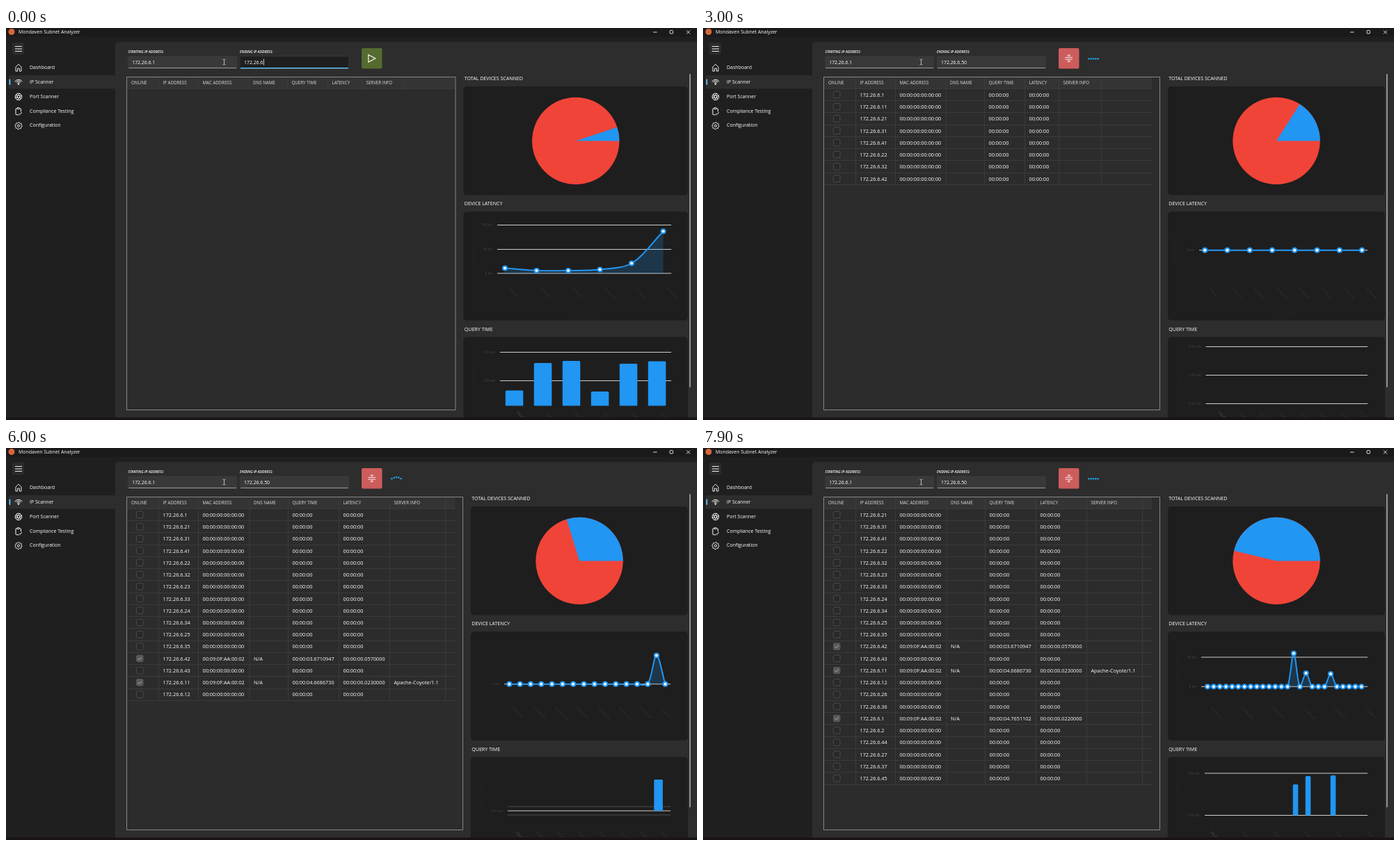
An HTML page with a canvas that plays this animation: 993x564 px, repeating every 8000 ms.

```html
<!DOCTYPE html>
<html lang="en">
<head>
<meta charset="utf-8">
<title>Mondaven Subnet Analyzer</title>
<style>
html, body { margin: 0; width: 100%; height: 100%; overflow: hidden; background: #1f1f1f; }
canvas { display: block; }
</style>
</head>
<body>
<canvas id="stage" width="993" height="564"></canvas>
<script>
const ctx = document.getElementById('stage').getContext('2d');
const LOOP = 8000, BLUE = '#2196f3', SANS = '"Open Sans", "Noto Sans", sans-serif';
const clamp = v => Math.max(0, Math.min(1, v));
const mix = (a, b, k) => a + (b - a) * k;

function text(str, x, mid, size, color = '#fff', align = 'left', style = '500') {
  ctx.font = `${style} ${size}px ${SANS}`;
  ctx.fillStyle = color;
  ctx.textAlign = align;
  ctx.fillText(str, x, mid + size * 0.36);
}
function turned(str, x, y, angle, size, color, align = 'left') {
  ctx.save();
  ctx.translate(x, y);
  ctx.rotate(angle);
  text(str, 0, 0, size, color, align);
  ctx.restore();
}
function rect(x, y, w, h, color) {
  ctx.fillStyle = color;
  ctx.fillRect(x, y, w, h);
}
function round(x, y, w, h, r, fill, stroke) {
  ctx.beginPath();
  ctx.roundRect(x, y, w, h, r);
  if (fill) { ctx.fillStyle = fill; ctx.fill(); }
  if (stroke) { ctx.strokeStyle = stroke; ctx.lineWidth = 1; ctx.stroke(); }
}
function path(points, color = '#fff', width = 1, closed = false) {
  ctx.beginPath();
  points.forEach(([x, y]) => ctx.lineTo(x, y));
  if (closed) ctx.closePath();
  ctx.strokeStyle = color;
  ctx.lineWidth = width;
  ctx.stroke();
}
function arc(x, y, r, a = 0, b = Math.PI * 2, color = '#fff', width = 1) {
  ctx.beginPath();
  ctx.arc(x, y, r, a, b);
  ctx.strokeStyle = color;
  ctx.lineWidth = width;
  ctx.stroke();
}
function disc(x, y, r, color) {
  ctx.beginPath();
  ctx.arc(x, y, r, 0, Math.PI * 2);
  ctx.fillStyle = color;
  ctx.fill();
}

// ---- window frame and navigation ----
const icons = [
  (x, y) => path([[x - 4, y - 1], [x, y - 5], [x + 4, y - 1], [x + 4, y + 5], [x + 1.4, y + 5],
    [x + 1.4, y + 1], [x - 1.4, y + 1], [x - 1.4, y + 5], [x - 4, y + 5]], '#fff', 0.9, true),
  (x, y) => {
    for (const r of [2.2, 4.2, 6.2]) arc(x, y + 2.5, r, -Math.PI * 0.82, -Math.PI * 0.18, '#fff', 1);
    disc(x, y + 2.6, 1.2, '#fff');
  },
  (x, y) => {
    arc(x, y, 4.8);
    for (let i = 0; i < 6; i++) {
      const a = i * Math.PI / 3;
      path([[x + 2 * Math.cos(a), y + 2 * Math.sin(a)],
        [x + 4.8 * Math.cos(a + 0.9), y + 4.8 * Math.sin(a + 0.9)]], '#fff', 0.9);
    }
    arc(x, y, 2);
  },
  (x, y) => {
    round(x - 4, y - 4, 7.5, 9, 1, null, '#fff');
    round(x - 2, y - 5.2, 3.5, 2, 0.8, '#1f1f1f', '#fff');
    rect(x + 0.6, y + 0.6, 4.4, 5, '#1f1f1f');
    path([[x + 1, y + 3], [x + 2.4, y + 4.4], [x + 4.8, y + 1.4]]);
  },
  (x, y) => {
    const rim = [];
    for (let i = 0; i < 32; i++) {
      const a = i * Math.PI / 16, r = i % 4 < 2 ? 5.1 : 4.1;
      rim.push([x + r * Math.cos(a), y + r * Math.sin(a)]);
    }
    path(rim, '#fff', 0.9, true);
    arc(x, y, 1.6, 0, Math.PI * 2, '#fff', 0.9);
  }
];
const menu = ['Dashboard', 'IP Scanner', 'Port Scanner', 'Compliance Testing', 'Configuration'];

function drawFrame() {
  rect(0, 0, 993, 564, '#1f1f1f');
  rect(0, 0, 993, 12.5, '#1b1a1a');
  disc(8, 5.5, 4.5, '#d9653b');
  text('Mondaven Subnet Analyzer', 18, 5.8, 6.95);
  path([[930, 6], [935.5, 6]], '#ddd');
  round(954, 3.5, 4.5, 4.5, 1, null, '#ddd');
  path([[978, 3.5], [983, 8.5]], '#ddd');
  path([[983, 3.5], [978, 8.5]], '#ddd');
  round(157, 20, 850, 550, 5, '#2d2d2d');
  round(9, 21, 17, 17.5, 3, '#2c2c2c');
  for (const y of [26.5, 30, 33.5]) path([[13, y], [23, y]], '#eee');
  round(4, 68, 153, 19.5, 2, '#2d2d2d');
  round(4.5, 73.5, 1.8, 8.5, 1, '#60cdff');
  menu.forEach((label, i) => {
    const y = 56.3 + i * 20.9;
    icons[i](18, y + 0.8);
    text(label, 34, y, 7);
  });
  round(982, 66, 1.8, 451, 1, '#9c9c9c');
}

// ---- address inputs and run button ----
function input(x, value, focused) {
  round(x, 40.5, 157, 17.5, 2, focused ? '#1f1f1f' : '#393939', '#363636');
  rect(x + 1, 57, 155, focused ? 1.4 : 1, focused ? '#60cdff' : '#9a9a9a');
  text(value, x + 6, 49.2, 6.9);
  if (focused) rect(x + 6.6 + ctx.measureText(value).width, 44.5, 0.8, 9, '#fff');
}
function drawControls(t) {
  const typed = t < 200 ? '' : t < 700 ? '.' : t < 800 ? '.5' : '.50';
  text('STARTING IP ADDRESS:', 175.5, 33.8, 5.1, '#fff', 'left', 'italic 600');
  text('ENDING IP ADDRESS:', 336, 33.8, 5.1, '#fff', 'left', 'italic 600');
  input(175.2, '172.26.6.1', false);
  input(336, '172.26.6' + typed, t < 1100);
  path([[311.5, 45], [313.5, 45.6], [315.5, 45]], '#ccc', 0.8);
  path([[313.5, 45.6], [313.5, 52.4]], '#ccc', 0.9);
  path([[311.5, 53], [313.5, 52.4], [315.5, 53]], '#ccc', 0.8);

  const scanning = t >= 1400;
  const green = t >= 200 && t < 800 ? '#4b5b2d' : '#556b2f';
  round(511, 29, 29.5, 29.5, 2, scanning ? '#cd5c5c' : green);
  if (!scanning) {
    path([[520.8, 38.5], [530.8, 43.7], [520.8, 49]], '#fff', 1.1, true);
    if (t >= 1100) round(510.5, 28.5, 30.5, 30.5, 3, null, '#fff');
    return;
  }
  for (const s of [-1, 1]) {
    const y = d => 43.7 + s * d;
    path([[520.5, y(1.4)], [531, y(1.4)]], '#fff', 0.9);
    path([[525.8, y(3)], [525.8, y(5.8)]], '#fff', 0.9);
    path([[523.4, y(5)], [525.8, y(3)], [528.2, y(5)]], '#fff', 0.8);
  }
  const u = ((t - 1400) % 1200) / 1000;
  for (let i = 0; i < 5; i++) {
    const p = ((u - 0.75 - i * 0.06 + 1.2) % 1.2) / 0.25;
    const lift = p < 1 ? 2.3 * Math.sin(Math.PI * p) : 0;
    disc(554.4 + i * 3.3, 44.3 - lift, 1.3, '#1ba1e2');
  }
}

// ---- results table; a star marks a host that answered ----
const batches = [
  [1400, '1 11 21 31 41'], [2300, '22 32'], [2500, '42'], [4100, '23 33'], [4300, '24 34'],
  [5200, '25 35'], [5700, '42* 43'], [5900, '11* 12'], [6200, '26 36'], [6300, '1* 2'],
  [6500, '44'], [7100, '27 37'], [7400, '45']
];
const replies = {
  42: ['00:00:03.6710947', '00:00:00.0570000', ''],
  11: ['00:00:04.6686730', '00:00:00.0230000', 'Apache-Coyote/1.1'],
  1: ['00:00:04.7651102', '00:00:00.0220000', '']
};
const heads = ['ONLINE', 'IP ADDRESS', 'MAC ADDRESS', 'DNS NAME', 'QUERY TIME', 'LATENCY', 'SERVER INFO'];

function rowsAt(t) {
  let rows = [];
  for (const [time, hosts] of batches) {
    if (time > t) break;
    for (const host of hosts.split(' ')) {
      const id = parseInt(host), online = host.endsWith('*');
      if (online) rows = rows.filter(r => r.id !== id);
      rows.push({ id, online });
    }
  }
  return rows;
}
function drawTable(t, rows) {
  const wide = rows.some(r => r.online);
  const cols = wide ? [174, 219.5, 276.5, 350, 405.5, 478.5, 551.5, 631.5]
    : [174, 219.5, 276.5, 349, 404.5, 462.5, 511.5, 572.5];
  const right = t < 1400 ? 646 : 656.5, H = 17.24, end = 87.5 + rows.length * H;
  rect(173.5, 70, right - 173.5, 479.5, '#2c2c2c');
  rect(174, 70.5, 471, 17, '#343434');
  cols.slice(1).forEach(x => path([[x, 71], [x, end]], '#3b3b3b'));
  for (let i = 0; i <= rows.length; i++) {
    const y = Math.round(87 + i * H) + 0.5;
    path([[174, y], [645, y]], '#3b3b3b');
  }
  heads.forEach((h, i) => text(h, cols[i] + 6, 79.2, 6.2, '#dcdcdc'));
  rows.forEach(({ id, online }, i) => {
    const y = 96.2 + i * H;
    round(187.5, y - 5, 9.5, 9.5, 2, online ? '#585858' : '#292929', online ? '#585858' : '#4a4a4a');
    if (online) path([[189.8, y - 0.2], [191.6, y + 1.6], [194.8, y - 1.8]], '#bbb', 0.9);
    const zero = '00:00:00', [query, latency, server] = online ? replies[id] : [zero, zero, ''];
    const cells = ['172.26.6.' + id, online ? '00:09:0F:AA:00:02' : zero + ':00:00:00',
      online ? 'N/A' : '', query, latency, server];
    cells.forEach((c, k) => text(c, cols[k + 1] + 6, y, 7.3));
  });
  round(173.5, 70.5, right - 173.5, 479, 0, null, '#868686');
}

// ---- charts ----
const previous = dx => ({
  t: 0, n: 6, step: 1, x0: 717 + dx, gap: 45.5, tail: 45.5, base: 353, left: 706 + dx, right: 956 + dx,
  grid: [[283.5, '100 ms'], [318.5, '50 ms'], [353, '0 ms']],
  ys: { 0: 345.5, 1: 349, 2: 349, 3: 347.5, 4: 338.5, 5: 292.5 },
  qLeft: 710 + dx, qBase: 543.5, slots: 6, qGrid: [[466.5, '6.00 sec'], [507.5, '3.00 sec']],
  bars: { 0: 521.5, 1: 482, 2: 479, 3: 523, 4: 483, 5: 479.5 }
});
const flat = (t, n, x0, gap, tail = gap) => ({
  t, n, step: 1, x0, gap, tail, base: 319.7, left: 713, right: 955, grid: [[319.7, '0 ms']], ys: {},
  qLeft: 722.5, qBase: 541, slots: n, bars: {},
  qGrid: [[458.5, '0.00 sec'], [499.5, '0.00 sec'], [540.5, '-0.00 sec']]
});
const active = o => ({ left: 716, right: 955, tail: o.gap, qLeft: 721, slots: o.n, ...o });
const states = [
  previous(0),
  flat(1500, 5, 721.2, 56.4),
  flat(2500, 8, 721.2, 32.25),
  flat(4100, 12, 723.5, 20.6, 17.6),
  flat(5200, 14, 723, 17.2),
  active({ t: 5700, n: 16, step: 2, x0: 723.3, gap: 15.3, tail: 12.6, base: 339.7, grid: [[339.7, '0 ms']],
    ys: { 14: 298.5 }, qBase: 522, slots: 15.67, bars: { 14: 477 },
    qGrid: [[522, '0.00 sec'], [516, '', 0.25], [528, '', 0.25]] }),
  active({ t: 6300, n: 22, step: 2, x0: 726.5, gap: 10.39, base: 343.4,
    grid: [[295.5, '50 ms'], [343.4, '0 ms']], ys: { 14: 295.5, 16: 324, 20: 325 }, slots: 21.9,
    qBase: 528.5, bars: { 14: 484, 16: 473, 20: 472 }, qGrid: [[467.5, '5.00 sec'], [528.5, '0.00 sec']] }),
  active({ t: 7400, n: 26, step: 5, x0: 725, gap: 8.85, base: 343.3,
    grid: [[301, '50 ms'], [343.3, '0 ms']], ys: { 14: 295.5, 16: 324, 20: 325 },
    qBase: 528.5, bars: { 14: 484, 16: 472, 20: 471 }, qGrid: [[468, '5.00 sec'], [528.5, '0.00 sec']] })
];
const pointAt = (s, i) => [
  s.x0 + s.gap * Math.min(i, s.n - 3) + s.tail * Math.max(0, i - s.n + 3), s.ys[i] ?? s.base];
const slotWidth = s => (s.right - s.qLeft) / s.slots;
const barAt = (s, i) => [s.qLeft + slotWidth(s) * (i + 0.5), s.bars[i] ?? s.qBase];

function gridLines(lines, left, right, labelGap, alpha) {
  for (const [y, label, dim = 1] of lines) {
    ctx.globalAlpha = alpha * dim;
    path([[left, y], [right, y]], '#cfcfcf');
    text(label, left - labelGap, y, 4.8, '#444', 'right');
  }
  ctx.globalAlpha = 1;
}
// Smooth curve: handles run parallel to the line joining neighbouring midpoints,
// shared out by the lengths of the two segments.
function trace(pts) {
  const SMOOTH = 0.65, at = i => pts[Math.max(0, Math.min(pts.length - 1, i))];
  const length = i => Math.hypot(at(i + 1)[0] - at(i)[0], at(i + 1)[1] - at(i)[1]);
  const handle = (i, side) => {
    const before = length(i - 1), after = length(i);
    const share = (side < 0 ? -before : after) / (before + after);
    return [0, 1].map(c => at(i)[c] + (at(i + 1)[c] - at(i - 1)[c]) / 2 * share * SMOOTH);
  };
  ctx.lineTo(...pts[0]);
  for (let i = 1; i < pts.length; i++)
    ctx.bezierCurveTo(...handle(i - 1, 1), ...handle(i, -1), ...pts[i]);
}
function drawLatency(s, prev, k, ids) {
  if (k < 1) gridLines(prev.grid, prev.left, prev.right, 6.8, 1 - k);
  gridLines(s.grid, s.left, s.right, 6.8, k);
  const base = mix(prev.base, s.base, k), pts = [];
  for (let i = 0; i < s.n; i++) {
    const to = pointAt(s, i), from = i < prev.n ? pointAt(prev, i) : [to[0], prev.base];
    pts.push([mix(from[0], to[0], k), mix(from[1], to[1], k)]);
  }
  ctx.beginPath();
  ctx.moveTo(pts[0][0], base);
  trace(pts);
  ctx.lineTo(pts[s.n - 1][0], base);
  ctx.fillStyle = 'rgba(33,150,243,0.2)';
  ctx.fill();
  ctx.beginPath();
  trace(pts);
  ctx.strokeStyle = BLUE;
  ctx.lineWidth = 2;
  ctx.stroke();
  for (const [x, y] of pts) {
    disc(x, y, 3, '#fff');
    arc(x, y, 3.1, 0, Math.PI * 2, BLUE, 2);
  }
  for (let i = 0; i < s.n; i += s.step)
    turned('172.26.6.' + ids(i), pts[i][0] + 4, 372, Math.PI / 4, 4.6, '#383838');
  turned('Latency (ms)', s.left - 35, 320, -Math.PI / 2, 7, '#242424', 'center');
  text('IP Address', (s.left + s.right) / 2, 408, 7, '#242424', 'center');
}
function drawQuery(s, prev, k, ids) {
  if (k < 1) gridLines(prev.qGrid, prev.qLeft, prev.right, 6.8, 1 - k);
  gridLines(s.qGrid, s.qLeft, s.right, 6.8, k);
  const base = mix(prev.qBase, s.qBase, k);
  const w = mix(...[prev, s].map(q => Math.min(25.5, slotWidth(q) * 0.84)), k);
  for (let i = 0; i < s.n; i++) {
    const to = barAt(s, i), from = i < prev.n ? barAt(prev, i) : [to[0], prev.qBase];
    const x = mix(from[0], to[0], k), y = mix(from[1], to[1], k);
    if (base - y > 0.5) round(x - w / 2, y, w, base - y, [1.5, 1.5, 0, 0], BLUE);
    if (i % s.step === 0)
      turned('172.26.6.' + ids(i), x + 4, 552, Math.PI / 4, 4.6, i ? '#3c3c3c' : '#666');
  }
  turned('Query Time', s.qLeft - 39, 500, -Math.PI / 2, 7, '#242424', 'center');
}

const pieKeys = [
  [1400, 18.2], [1900, 36], [2300, 36], [2800, 57.6], [4100, 57.6], [4400, 84.7], [4500, 86.4],
  [5200, 86.4], [5600, 100.8], [5800, 100.8], [6000, 107], [6200, 115.2], [6600, 136.8],
  [6700, 144], [7100, 144], [7600, 166.4]
];
function pieAngle(t) {
  if (t <= pieKeys[0][0]) return pieKeys[0][1];
  const i = pieKeys.findIndex(key => key[0] > t);
  if (i < 0) return pieKeys[pieKeys.length - 1][1];
  const [a, from] = pieKeys[i - 1], [b, to] = pieKeys[i];
  return mix(from, to, (t - a) / (b - a));
}
function drawPie(t) {
  const x = t < 1400 ? 818.7 : t < 1500 ? 829.2 : 824, a = -pieAngle(t) * Math.PI / 180;
  disc(x, 162.4, 62.7, '#f04438');
  ctx.beginPath();
  ctx.moveTo(x, 162.4);
  ctx.arc(x, 162.4, 62.7, a, 0);
  ctx.fillStyle = BLUE;
  ctx.fill();
}
function drawCharts(t, rows) {
  const x = t < 1400 ? 657.3 : 667.8;
  ['TOTAL DEVICES SCANNED', 'DEVICE LATENCY', 'QUERY TIME'].forEach((title, i) => {
    text(title, x + 1.5, 72.8 + i * 180.1, 7.05);
    round(x, 84 + i * 180.3, 980 - x, 156.5, 5, '#1e1e1e');
  });
  drawPie(t);
  states[0] = previous(t < 1400 ? 0 : 10.5);
  let i = states.length - 1;
  while (states[i].t > t) i--;
  const s = states[i], prev = states[Math.max(0, i - 1)];
  const k = i ? 1 - Math.pow(1 - clamp((t - s.t) / 300), 2) : 1;
  const ids = j => i ? (rows[j % rows.length] || { id: 1 }).id : [1, 2, 11, 25, 42, 50][j];
  ctx.save();
  ctx.beginPath();
  ctx.rect(x, 84, 980 - x, 476);
  ctx.clip();
  drawLatency(s, prev, k, ids);
  drawQuery(s, prev, k, ids);
  ctx.restore();
}

function draw(now) {
  const t = Math.floor((now % LOOP) / 100) * 100, rows = rowsAt(t);
  drawFrame();
  drawControls(t);
  drawTable(t, rows);
  drawCharts(t, rows);
  rect(0, 560.5, 993, 3.5, '#1a1314');
}
const start = performance.now();
function tick() {
  draw(performance.now() - start);
  requestAnimationFrame(tick);
}
tick();
</script>
</body>
</html>
```
